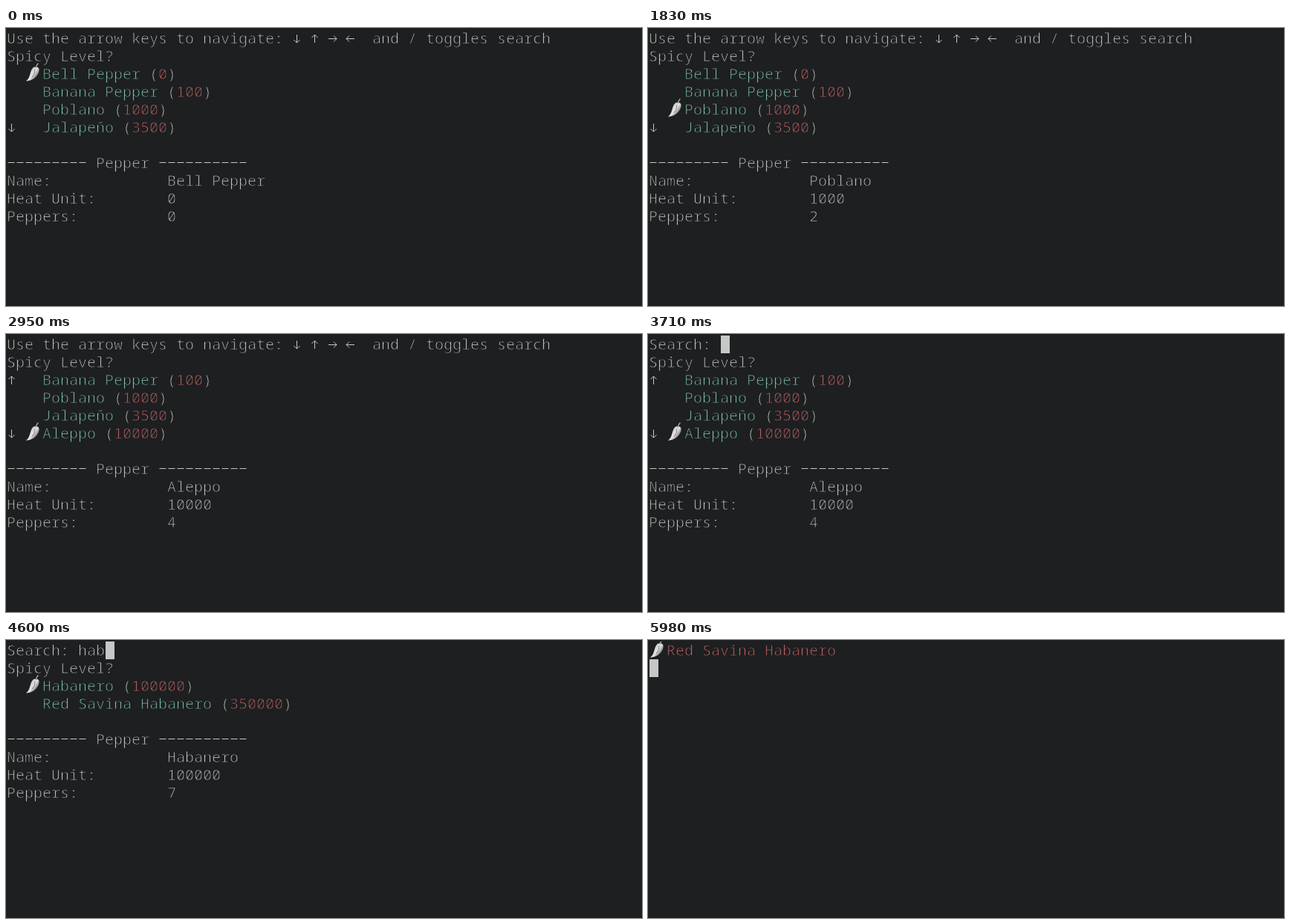
Animation, 856 px wide and 375 px high, one loop 6.08 s. Source, as an HTML page with a canvas:

```html
<!DOCTYPE html>
<html lang="en">
<head>
<meta charset="utf-8">
<title>Pepper prompt</title>
<style>
html, body { margin: 0; width: 100%; height: 100%; overflow: hidden; background: #1d1f21; }
canvas { display: block; }
</style>
</head>
<body>
<canvas id="stage" width="856" height="375"></canvas>
<script>
const ctx = document.getElementById('stage').getContext('2d');
const CELL_W = 12, CELL_H = 24, PAD = 2, LOOP = 6080, VISIBLE = 4;
const BACK = '#1d1f21', FORE = '#c5c8c6', CYAN = '#80c4a8', RED = '#cc6666';
const THINNING = 0.85;

const peppers = [
  ['Bell Pepper', 0], ['Banana Pepper', 100], ['Poblano', 1000],
  ['Jalapeño', 3500], ['Aleppo', 10000], ['', 30000], ['', 50000],
  ['Habanero', 100000], ['Red Savina Habanero', 350000], ["Dragon's Breath", 855000]
].map(([name, heat], id) => ({ name, heat, id }));

// query: null shows the key help instead of the search field
const steps = [
  { at: 0, pick: 0, query: null },
  { at: 1410, pick: 1, query: null },
  { at: 1830, pick: 2, query: null },
  { at: 2370, pick: 3, query: null },
  { at: 2950, pick: 4, query: null },
  { at: 3710, pick: 4, query: '' },
  { at: 4030, pick: 0, query: 'h' },
  { at: 4250, pick: 0, query: 'ha' },
  { at: 4600, pick: 0, query: 'hab' },
  { at: 5410, pick: 1, query: 'hab' },
  { at: 5980, done: true }
];

const cellX = col => PAD + col * CELL_W;
const cellY = row => PAD + row * CELL_H;

function line(color, width, path) {
  ctx.strokeStyle = color;
  ctx.lineWidth = width;
  ctx.stroke(new Path2D(path));
}

function arrow(x, y, color, angle) {
  ctx.save();
  ctx.translate(x + 5.5, y + 12.5);
  ctx.rotate(angle);
  line(color, 1, 'M-5.5 0H5.5M1.5 -4L5.5 0L1.5 4');
  ctx.restore();
}

const marks = {
  '→': (x, y, color) => arrow(x, y, color, 0),
  '↓': (x, y, color) => arrow(x, y, color, Math.PI / 2),
  '←': (x, y, color) => arrow(x, y, color, Math.PI),
  '↑': (x, y, color) => arrow(x, y, color, -Math.PI / 2),
  '-': (x, y, color) => line(color, 1, `M${x + 0.5} ${y + 11.5}h9`)
};

// A background outline trims each glyph to a hairline weight.
function glyph(char, x, y, color) {
  ctx.fillStyle = color;
  ctx.fillText(char, x, y);
  ctx.strokeStyle = BACK;
  ctx.lineWidth = THINNING;
  ctx.strokeText(char, x, y);
}

function write(col, row, text, color = FORE) {
  [...text].forEach((char, i) => {
    const x = cellX(col + i), y = cellY(row);
    if (marks[char]) marks[char](x, y, color);
    else glyph(char, x - 1, y + 19, color);
  });
}

function cursor(col, row) {
  ctx.fillStyle = FORE;
  ctx.fillRect(cellX(col), cellY(row), CELL_W, CELL_H);
}

function chili(col, row) {
  ctx.save();
  ctx.translate(cellX(col), cellY(row));
  ctx.lineCap = 'round';
  const skin = ctx.createLinearGradient(5, 8, 15, 15);
  skin.addColorStop(0, '#c4c4c4');
  skin.addColorStop(0.55, '#e6e6e6');
  skin.addColorStop(1, '#8c8c8c');
  ctx.fillStyle = skin;
  ctx.fill(new Path2D('M10 4C12 2 17 2 18.5 5C19.5 13 11 21.5 1 21.5C7 17.5 6 8 10 4Z'));
  line('#808080', 1, 'M13 6Q13 12 9.5 16');
  line('#a4a4a4', 1.6, 'M14.5 3.5Q15 0 17 -2');
  ctx.restore();
}

function drawHeader(query) {
  if (query === null) {
    write(0, 0, 'Use the arrow keys to navigate: ↓ ↑ → ←  and / toggles search');
  } else {
    write(0, 0, 'Search: ' + query);
    cursor(8 + query.length, 0);
  }
  write(0, 1, 'Spicy Level?');
}

function drawItem(pepper, row, active) {
  const heat = String(pepper.heat);
  const open = 4 + pepper.name.length + 1;
  if (active) chili(2, row);
  write(4, row, pepper.name, CYAN);
  write(open, row, '(');
  write(open + 1, row, heat, RED);
  write(open + 1 + heat.length, row, ')');
}

function drawDetails(pepper, row) {
  write(0, row, '--------- Pepper ----------');
  [['Name:', pepper.name], ['Heat Unit:', pepper.heat], ['Peppers:', pepper.id]]
    .forEach(([label, value], i) => {
      write(0, row + 1 + i, label);
      write(18, row + 1 + i, String(value));
    });
}

function drawPrompt({ pick, query }) {
  const matches = peppers.filter(p => p.name.toLowerCase().includes(query || ''));
  const first = Math.max(0, pick - VISIBLE + 1);
  const shown = matches.slice(first, first + VISIBLE);

  drawHeader(query);
  shown.forEach((pepper, i) => drawItem(pepper, 2 + i, first + i === pick));
  if (first > 0) write(0, 2, '↑');
  if (first + VISIBLE < matches.length) write(0, 1 + VISIBLE, '↓');
  drawDetails(matches[pick], 3 + shown.length);
}

function drawResult() {
  chili(0, 0);
  write(2, 0, 'Red Savina Habanero', RED);
  cursor(0, 1);
}

function render() {
  const time = performance.now() % LOOP;
  const step = steps.findLast(s => s.at <= time);

  ctx.fillStyle = BACK;
  ctx.fillRect(0, 0, 856, 375);
  ctx.fillStyle = '#211d1f';
  ctx.fillRect(0, 372, 856, 3);

  ctx.save();
  ctx.beginPath();
  ctx.rect(PAD, PAD, 854, 370);
  ctx.clip();
  ctx.font = '200 20px "Noto Sans Mono", monospace';
  ctx.lineJoin = 'round';
  if (step.done) drawResult();
  else drawPrompt(step);
  ctx.restore();
  requestAnimationFrame(render);
}

render();
</script>
</body>
</html>
```
